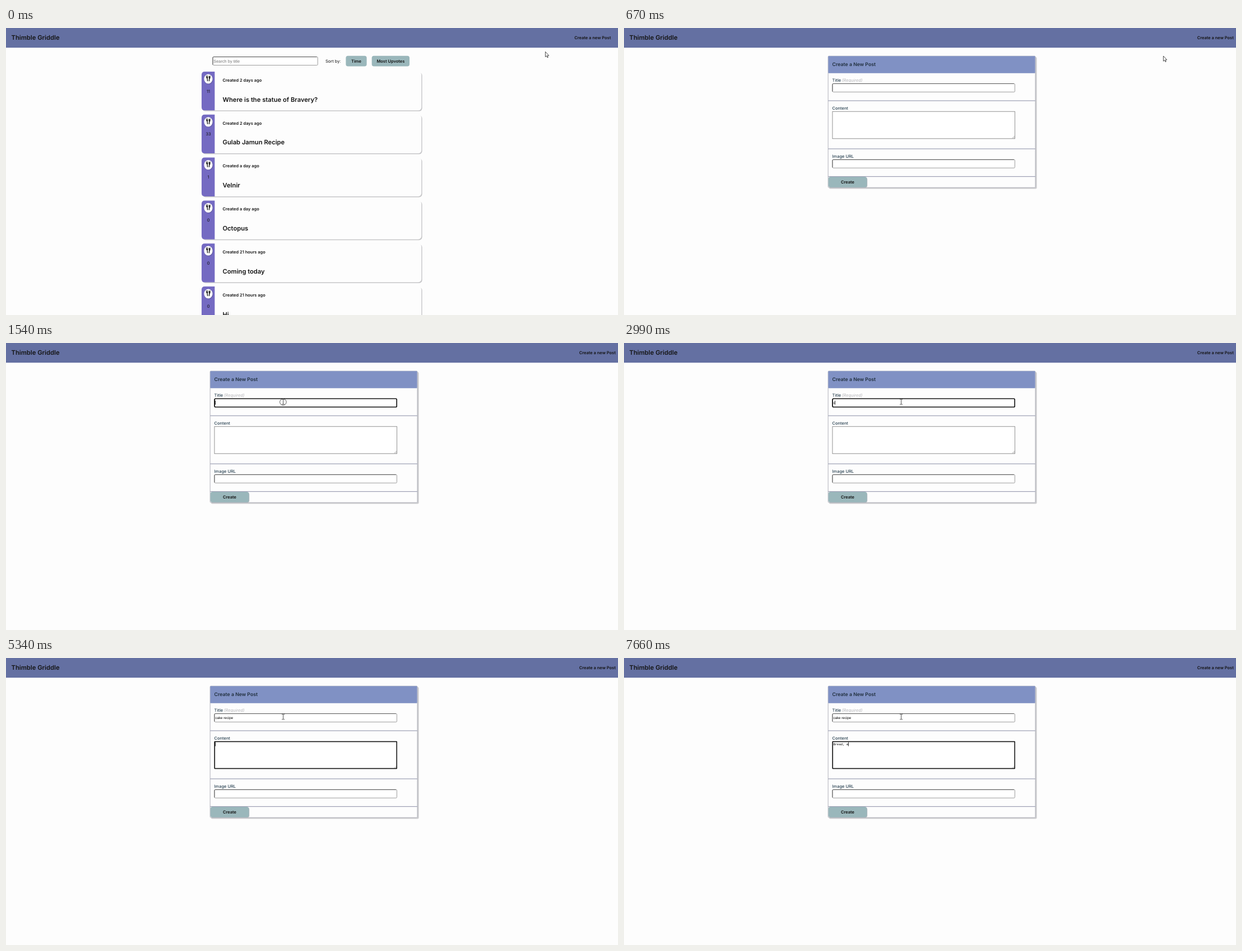
Recreate the animation shown at these times as an HTML page. Size 1092 by 513 pixels, loop 8 s.

```html
<!DOCTYPE html>
<html lang="en">
<head>
<meta charset="utf-8">
<title>Recipe board</title>
<style>
  html, body { margin: 0; width: 100%; height: 100%; overflow: hidden; background: #fdfdfd; }
  svg { display: block; width: 100%; height: 100%; }
  text {
    font: 600 7.467px Inter, sans-serif;
    fill: #141414;
    white-space: pre;
    text-rendering: geometricPrecision;
  }
  .big { font-size: 11.2px; }
  .plain { font-weight: 400; }
  .label { font-weight: 500; fill: #2b4353; }
  .heading { font-size: 8.74px; fill: #21303f; }
  .hint { font-weight: 400; font-style: italic; fill: #b5b5b9; }
  .placeholder { font: 7.4px "Liberation Sans", Arial, sans-serif; fill: #757575; }
  .typed { font: 6.222px "Liberation Sans", Arial, sans-serif; fill: #000; }
  .mono { font: 5.6px "Liberation Mono", monospace; fill: #000; }
  .middle { text-anchor: middle; }
  .end { text-anchor: end; }
</style>
</head>
<body>
<svg id="stage" viewBox="0 0 1092 513">
  <defs>
    <g id="vote">
      <ellipse cx="361.7" cy="91.8" rx="7.7" ry="8.7" fill="#4b4681" opacity=".55"/>
      <ellipse cx="361" cy="91" rx="7.6" ry="8.6" fill="#fdfdfd"/>
      <g fill="none" stroke="#111" stroke-linecap="round">
        <path d="M357.3 85.5l.3 3M358.8 85.3v3.2M360.3 85.5l-.2 3" stroke-width=".8"/>
        <path d="M357.7 88.6q1.1 1.3 2.3 0M359 89l.5 5.5" stroke-width="1.3"/>
        <path d="M362.9 89.5l-.5 5" stroke-width="1.4"/>
      </g>
      <path d="M362.1 90.3V87q.3-1.7 2.4-2v5.3z" fill="#111"/>
    </g>
  </defs>
  <rect width="1092" height="513" fill="#fdfdfd"/>
  <rect width="1092" height="35.2" fill="#6470a2"/>
  <text class="big" x="9.6" y="21.4">Thimble Griddle</text>
  <text class="end" id="newPost" y="20.1">Create a new Post</text>
  <g id="listPage"></g>
  <g id="formPage"></g>
  <g fill="none" stroke="#101010">
    <rect id="titleFocus" x="372.2" y="99.5" width="325" height="15" rx="1.8" stroke-width="1.6"/>
    <rect id="contentFocus" x="372.3" y="149.4" width="324.9" height="48.2" rx=".6" stroke-width="1.5"/>
  </g>
  <text class="typed" id="title" x="373.4" y="109"></text>
  <text class="mono" id="content" x="373.4" y="155.9"></text>
  <rect id="caret" width=".8" height="7.2" fill="#000"/>
  <circle id="ring" cx="494.4" cy="105.5" r="5.8" fill="none" stroke="#333" stroke-width=".8"/>
  <g stroke="#222" stroke-width=".8" stroke-linejoin="round">
    <path id="arrow" fill="#fff" d="M.4.4V9.7L2.5 7.8 4 11 5.3 10.4 3.9 7.3H6.7Z"/>
    <path id="hand" fill="#fff" d="M3 7V1.3a.9.9 0 0 1 1.8 0V5l3 .7q1 .3.9 1.5L8 10.5v2H3.8V11L.8 7.6q-.2-1 .8-.9Z"/>
    <path id="beam" fill="none" d="M-2.4-4.6h1.7l.7.6.7-.6h1.7M0-4V4M-2.4 4.6h1.7l.7-.6.7.6h1.7"/>
  </g>
</svg>
<script>
const $ = id => document.getElementById(id);
const label = (x, y, words, style = '') => `<text x="${x}" y="${y}" class="${style}">${words}</text>`;
const rect = (x, y, w, h, fill, rx = 0, extra = '') =>
  `<rect x="${x}" y="${y}" width="${w}" height="${h}" fill="${fill}" rx="${rx}" ${extra}/>`;

function button(x, y, w, words) {
  return rect(x, y, w, 18.7, '#9ab7bb', 3.8) + label(x + w / 2, y + 12, words, 'middle');
}

function input(x, y, w) {
  return rect(x + .4, y + .4, w - .8, 14.9, '#fff', 1.6, 'stroke="#858585" stroke-width=".8"') +
    `<path d="M${x + .4} ${y + 14.5}V${y + 2}q0-1.6 1.6-1.6H${x + w - 2}" fill="none" stroke="#4c4c4c" stroke-width=".9"/>`;
}

function card([age, title, votes], index) {
  return `<g transform="translate(0 ${index * 76.8})">` +
    rect(350.4, 79.4, 392.2, 69.4, '#c6c6c8', 5.6) +
    rect(349, 78, 392.2, 69.3, '#fdfdfd', 5.6) +
    '<path d="M372.4 78H354.6q-5.6 0-5.6 5.6v58.1q0 5.6 5.6 5.6h17.8z" fill="#746ac2"/>' +
    '<use href="#vote"/>' +
    label(361, 115.7, votes, 'middle plain') +
    label(386.5, 95.8, 'Created ' + age, '') +
    label(386.5, 131.6, title, 'big') + '</g>';
}

$('listPage').innerHTML =
  input(368.6, 51.2, 188) + label(370.3, 61.6, 'Search by title', 'placeholder') +
  label(570, 61.7, 'Sort by:', 'plain') +
  button(606.4, 49.8, 37.2, 'Time') + button(652.7, 49.8, 67.3, 'Most Upvotes') +
  [
    ['2 days ago', 'Where is the statue of Bravery?', 11],
    ['2 days ago', 'Gulab Jamun Recipe', 33],
    ['a day ago', 'Velnir', 1],
    ['a day ago', 'Octopus', 0],
    ['21 hours ago', 'Coming today', 0],
    ['21 hours ago', 'Hi', 0]
  ].map(card).join('');

$('formPage').innerHTML =
  rect(366, 52, 370.6, 235.6, '#cdcdd0', 2) +
  rect(364.2, 50.2, 369.8, 235, '#fdfdfd', 1.5, 'stroke="#a9abb5" stroke-width=".9"') +
  rect(364.4, 50.2, 369.2, 30.6, '#8091c4', 1) +
  [130, 216, 265.5].map(y => rect(364.2, y - .6, 369.6, 1.2, '#9c9fb4')).join('') +
  label(371.6, 68.2, 'Create a New Post', 'heading') +
  label(371.6, 95.8, 'Title', 'label') + label(388.8, 95.8, '(Required)', 'hint') +
  input(371.6, 99.1, 326.2) +
  label(371.6, 145.9, 'Content', 'label') +
  rect(372, 149.2, 325.4, 48.6, '#fff', 0, 'stroke="#777" stroke-width=".8"') +
  '<path d="M692.8 197l4-4M695 197l1.8-1.8" stroke="#777" stroke-width=".6"/>' +
  label(371.6, 232, 'Image URL', 'label') +
  input(371.6, 234.9, 326.2) +
  rect(365.2, 267, 69, 18.4, '#b4b8bd', 3.8) +
  button(364.6, 266, 68.8, 'Create');

// Pointer poses: start time, shape, x, y
const pointerSteps = [
  [0, 'arrow', 962, 42], [120, 'arrow', 985, 33], [240, 'hand', 1010.6, 22.4], [390, 'hand', 1029.6, 15.3],
  [670, 'arrow', 962, 49.6], [820, 'arrow', 925, 85], [940, 'arrow', 840, 160], [1060, 'arrow', 720, 235],
  [1180, 'arrow', 610, 266], [1300, 'arrow', 535, 200], [1420, 'beam', 494.6, 105.2]
];
const titleKeys = [2990, 3140, 3260, 3540, 3660, 3810, 3930, 4360, 4510, 4790, 4940];
const contentKeys = [5860, 6010, 6280, 6430, 6680, 6800, 7110, 7660];
const caretOff = [[2090, 2620], [5740, 5860], [7510, 7660]];

const show = (id, visible) => $(id).setAttribute('visibility', visible ? 'visible' : 'hidden');
const typed = (words, keys, t) => words.slice(0, keys.filter(key => key <= t).length);

function draw(t) {
  const onForm = t >= 670, inTitle = t >= 1540 && t < 5340, inContent = t >= 5340;
  show('listPage', !onForm);
  show('formPage', onForm);
  show('titleFocus', inTitle);
  show('contentFocus', inContent);
  show('ring', t >= 1540 && t < 1660);
  $('newPost').setAttribute('x', onForm ? 1087.8 : 1079.3);

  $('title').textContent = typed('cake recipe', titleKeys, t);
  $('content').textContent = typed('Bread, e', contentKeys, t);
  const field = $(inContent ? 'content' : 'title');
  const width = field.textContent ? field.getComputedTextLength() : 0;
  $('caret').setAttribute('x', 373.1 + width);
  $('caret').setAttribute('y', inContent ? 150.4 : 103);
  show('caret', (inTitle || inContent) && !caretOff.some(([from, to]) => t >= from && t < to));

  const [, shape, x, y] = pointerSteps.findLast(step => step[0] <= t);
  for (const id of ['arrow', 'hand', 'beam']) show(id, id === shape);
  $(shape).setAttribute('transform', `translate(${x} ${y})`);
}

const start = performance.now();
function tick() {
  draw((performance.now() - start) % 8000);
  requestAnimationFrame(tick);
}
tick();
</script>
</body>
</html>
```
